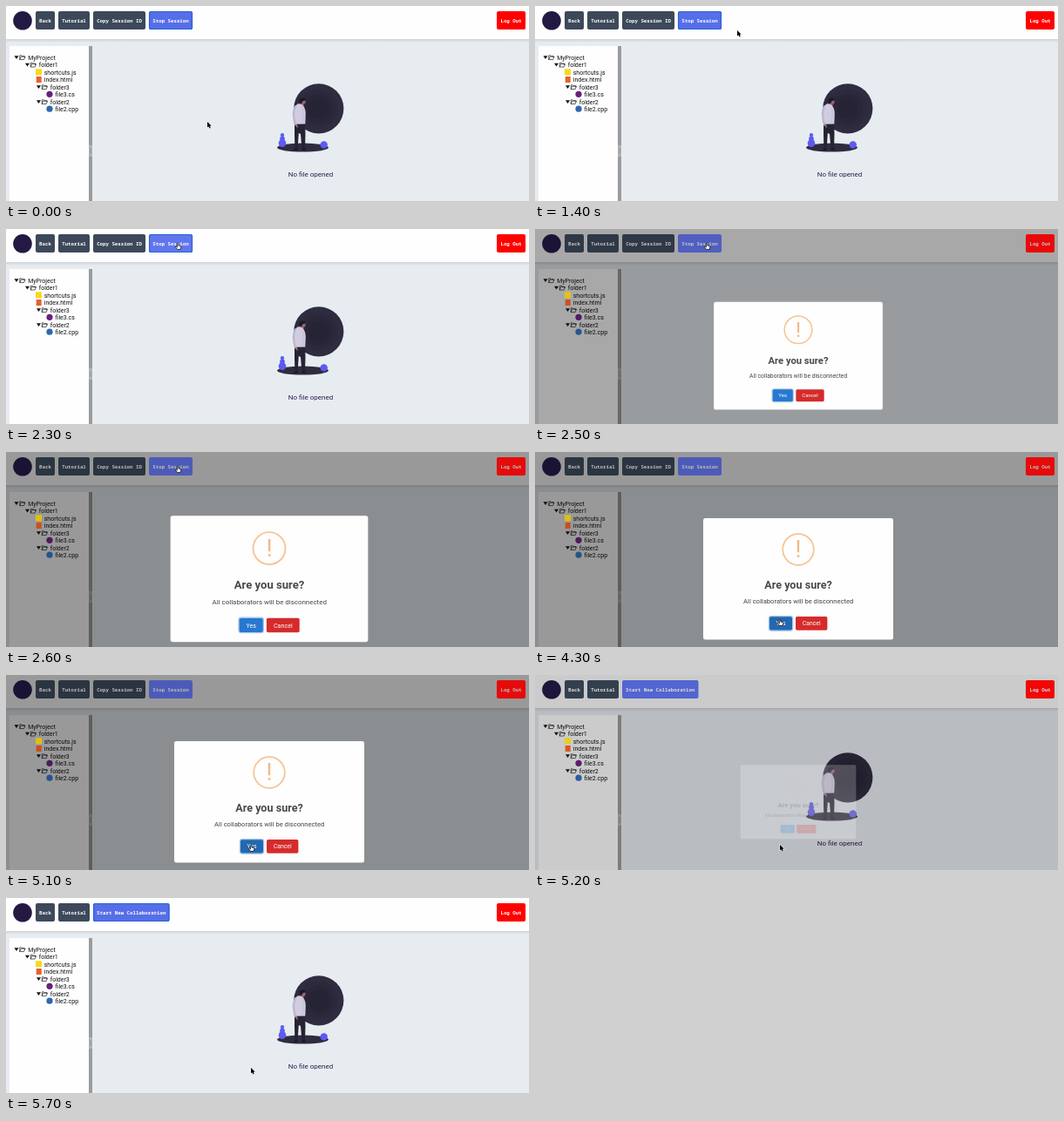
An HTML page with a canvas that plays this animation: 600 px wide and 224 px high, repeating every 5800 ms.

```html
<!DOCTYPE html>
<html lang="en">
<head>
<meta charset="utf-8">
<title>Stop session</title>
<style>
html, body { margin: 0; width: 100%; height: 100%; overflow: hidden; }
canvas { display: block; width: 600px; height: 224px; }
</style>
</head>
<body>
<canvas id="stage" width="600" height="224"></canvas>
<script>
const ctx = document.getElementById('stage').getContext('2d');
const LOOP = 5800, STEP = 100;
const SANS = 'Roboto, Arial, sans-serif';
const MONO = '"Noto Sans Mono", "DejaVu Sans Mono", monospace';
const INK = '#2f2c40', BLUE = '#5d5af2';

// time, x, y of the pointer tip
const path = [
  [0, 231, 133], [200, 231, 133], [700, 231, 84], [1200, 232, 32],
  [1400, 232, 28], [1500, 229, 26], [1800, 202, 18], [2000, 197, 16],
  [3000, 197, 16], [3200, 206, 46], [3600, 269, 165],
  [3900, 280, 191], [4300, 281, 192], [4900, 281, 195], [5800, 281, 195]
];
// time, scale of the dialog
const zoom = [[2460, 0.7], [2595, 1.05], [2700, 0.95], [2760, 1], [5125, 1], [5275, 0.5]];
const shade = [[2420, 0], [2500, 0.34], [2600, 0.4], [5120, 0.4], [5200, 0.2], [5280, 0]];

const clamp = v => Math.max(0, Math.min(1, v));
const lerp = (a, b, k) => a + (b - a) * k;
const smooth = k => k * k * (3 - 2 * k);
const easeOut = k => 1 - Math.pow(1 - k, 2.2);
const linear = k => k;

function track(keys, t, ease, col = 1) {
  if (t <= keys[0][0]) return keys[0][col];
  for (let i = 1; i < keys.length; i++) {
    const a = keys[i - 1], b = keys[i];
    if (t <= b[0]) return lerp(a[col], b[col], ease((t - a[0]) / (b[0] - a[0])));
  }
  return keys[keys.length - 1][col];
}

function mix(a, b, k) {
  const ch = (s, i) => parseInt(s.substr(1 + i * 2, 2), 16);
  return 'rgb(' + [0, 1, 2].map(i => Math.round(lerp(ch(a, i), ch(b, i), k))).join(',') + ')';
}

function rect(x, y, w, h, fill) {
  ctx.fillStyle = fill;
  ctx.fillRect(x, y, w, h);
}

function box(x, y, w, h, r, fill, line, width = 1) {
  ctx.beginPath();
  ctx.roundRect(x, y, w, h, r);
  if (fill) { ctx.fillStyle = fill; ctx.fill(); }
  if (line) { ctx.strokeStyle = line; ctx.lineWidth = width; ctx.stroke(); }
}

function oval(x, y, rx, ry, fill) {
  ctx.beginPath();
  ctx.ellipse(x, y, rx, ry, 0, 0, Math.PI * 2);
  ctx.fillStyle = fill;
  ctx.fill();
}

const dot = (x, y, r, fill) => oval(x, y, r, r, fill);

function shape(d, fill, line, width = 1) {
  const p = new Path2D(d);
  if (fill) { ctx.fillStyle = fill; ctx.fill(p); }
  if (line) {
    ctx.strokeStyle = line;
    ctx.lineWidth = width;
    ctx.lineJoin = ctx.lineCap = 'round';
    ctx.stroke(p);
  }
}

function text(s, x, y, font, fill, align = 'left') {
  ctx.font = font;
  ctx.fillStyle = fill;
  ctx.textAlign = align;
  ctx.fillText(s, x, y);
}

function page() {
  rect(0, 0, 600, 224, '#e7ecf1');
  const g = ctx.createLinearGradient(0, 38, 0, 42);
  g.addColorStop(0, '#cfd3d8');
  g.addColorStop(1, '#e7ecf1');
  rect(0, 38, 600, 4, g);
  rect(0, 0, 600, 38, '#fefefe');
  rect(4, 46, 91, 178, '#fefefe');
  rect(95, 46, 4, 178, '#9c9c9c');
  rect(95, 160, 4, 13, '#b4b4b4');
  rect(96.5, 163, 1, 7, '#8c8c8c');
}

function folder(x, y, name) {
  shape(`M${x} ${y - 1.7}h5l-2.5 3.6z`, '#111111');
  shape(`M${x + 6.3} ${y + 2.2}v-4.4h2l.7 .9h2.6v1.2M${x + 6.3} ${y + 2.2}l1.4-3.1h4.9l-1.3 3.1z`,
    null, '#222222', 0.7);
  text(name, x + 15.7, y + 2.5, '7px ' + SANS, '#111111');
}

function tree() {
  folder(9.5, 59, 'MyProject');
  folder(22, 67.5, 'folder1');
  folder(35, 93, 'folder3');
  folder(35, 110, 'folder2');
  const file = (s, x, y) => text(s, x, y + 2.5, '7px ' + SANS, '#111111');
  file('shortcuts.js', 43.7, 76);
  file('index.html', 43.7, 84.5);
  file('file3.cs', 56.5, 101.5);
  file('file2.cpp', 56.5, 118.5);
}

function icons(k) {
  rect(34, 72.3, 7, 7, mix('#f7d91e', '#e0c010', k));
  rect(34.7, 81, 6, 7, mix('#e8602c', '#c8501f', k));
  dot(50, 101.3, 3.6, mix('#68217a', '#4c1a5c', k));
  dot(50, 118.2, 3.6, mix('#2f66ad', '#27538c', k));
}

function picture() {
  oval(340.5, 162.6, 29.5, 5, INK);
  dot(358.8, 117.8, 28.6, INK);
  for (const r of [22, 17, 12]) {
    ctx.beginPath();
    ctx.arc(358.8, 117.8, r, 0, Math.PI * 2);
    ctx.fillStyle = 'rgba(0,0,0,.07)';
    ctx.fill();
  }
  dot(317, 157.6, 4.3, BLUE);
  dot(317, 152.4, 2.8, BLUE);
  dot(317, 148.2, 2.1, BLUE);
  dot(364.7, 159.4, 4.2, BLUE);
  // standing figure
  shape('M331 134L343 134L343.5 147L343 163.5L339.4 164L338 147L335.8 146L334.6 164L331.4 164.4L331 148Z', '#252334');
  shape('M331.2 163.6h3.4l-.2 2.4h-4.6zM339.4 163.2h3.6l1.8 2.5h-5.2z', '#1b1a28');
  shape('M338.8 111.5L342 112L341 116L337.4 115Z', '#a0616a');
  shape('M334.6 112.6Q338 111.4 341 114.6Q344.2 119 343.7 126L343.3 135.4L331 135.8Q331.6 128 330.2 123Q329.6 115.5 334.6 112.6Z', '#d0cde1');
  shape('M332 115.5Q329.6 120 330 126L331.2 134L333 136.8', null, '#bbb8d0', 2.4);
  shape('M333 136.6L334.2 138.8', null, '#a0616a', 1.7);
  shape('M340.5 117L341.3 126L340 134', null, '#bbb8d0', 0.7);
  dot(340.6, 109.9, 3, '#a0616a');
  shape('M336.4 110.8Q335.6 106.4 339.6 105.6Q343.2 105.2 343.8 108.2L340.4 109.2L339 112.3Z', '#1b1a28');
  text('No file opened', 349.5, 196, '8px ' + SANS, '#2a1d4a', 'center');
}

function button(x, w, label, fill, ink, ring) {
  box(x, 6, w, 21, 2, fill);
  if (ring) box(x + 0.5, 6.5, w - 1, 20, 2, null, '#2563d6', 1.2);
  text(label, x + w / 2, 18.6, 'bold 5.75px ' + MONO, ink, 'center');
}

function header(k, stopped, ring, hover) {
  const dark = mix('#3d495a', '#2b3542', k), ink = mix('#ffffff', '#bcbcbc', k);
  const blue = mix(hover ? '#6176ee' : '#566ee8', '#4d5bb8', k);
  dot(19, 16.8, 10.8, mix('#231942', '#1a1334', k));
  button(34, 22, 'Back', dark, ink);
  button(60, 36, 'Tutorial', dark, ink);
  if (stopped) {
    button(100, 87.5, 'Start New Collaboration', blue, ink, ring);
  } else {
    button(100, 60, 'Copy Session ID', dark, ink);
    button(164, 50, 'Stop Session', blue, ink, ring);
  }
  button(563, 33, 'Log Out', mix('#fe0000', '#e60b0b', k), ink);
}

function dialog(scale, alpha, hover) {
  ctx.save();
  ctx.globalAlpha = alpha;
  ctx.translate(302, 145.7);
  ctx.scale(scale, scale);
  ctx.translate(-302, -145.7);
  box(193, 76, 218, 139.4, 2.5, '#fefefe');
  ctx.beginPath();
  ctx.arc(302, 112, 17.8, 0, Math.PI * 2);
  ctx.strokeStyle = '#f6c596';
  ctx.lineWidth = 1.8;
  ctx.stroke();
  text('!', 302, 121.4, '27px ' + SANS, '#f3b984', 'center');
  text('Are you sure?', 302, 156.5, 'bold 12.6px ' + SANS, '#494949', 'center');
  text('All collaborators will be disconnected', 302.2, 174, '7.63px ' + SANS, '#444444', 'center');
  box(268.6, 188.8, 26.8, 16.2, 2.4, null, '#a5c8ec', 1.8);
  box(269, 189.2, 26, 15.4, 1.8, hover ? '#2268b0' : '#2778cf');
  box(299, 189, 36.4, 15.8, 1.8, '#d52b2b');
  text('Yes', 282, 199.4, '6.9px ' + SANS, '#ffffff', 'center');
  text('Cancel', 317.2, 199.4, '6.9px ' + SANS, '#ffffff', 'center');
  ctx.restore();
}

function pointer(x, y, hand) {
  ctx.save();
  ctx.translate(x, y);
  if (hand) {
    shape('M-.7 .6Q0-.5 .8 .6V3L3.2 3.5Q4 3.8 3.8 5L3.2 7.4H-.5L-2.6 4.6Q-2.5 3.6-1.5 4L-.7 4.7Z',
      '#ffffff', '#111111', 0.8);
  } else {
    shape('M0 0V6.6L1.5 5.2L2.6 7.6L3.7 7.1L2.7 4.8H4.6Z', '#000000', '#ffffff', 0.9);
    shape('M0 0V6.6L1.5 5.2L2.6 7.6L3.7 7.1L2.7 4.8H4.6Z', '#000000');
  }
  ctx.restore();
}

function draw(t) {
  const dim = track(shade, t, linear), k = dim / 0.4;
  const open = t >= 2460 && t < 5275;
  const stopped = t >= 5150;
  const x = track(path, t, smooth), y = track(path, t, smooth, 2);
  const overStop = t < 3100 && x < 213 && y < 27;
  const overYes = t < 5150 && x > 269 && x < 295 && y > 188;

  page();
  tree();
  picture();
  rect(0, 0, 600, 224, `rgba(0,0,0,${dim})`);
  header(k, stopped, !open, overStop);
  icons(k);
  if (open) {
    const fade = easeOut(clamp((t - 5125) / 150));
    const scale = t < 5125 ? track(zoom, t, easeOut) : lerp(1, 0.5, fade);
    dialog(scale, 1 - fade, overYes);
  }
  pointer(x, y, overStop || overYes);
}

const start = performance.now();
function tick() {
  const t = (performance.now() - start) % LOOP;
  draw(Math.floor(t / STEP) * STEP);
  requestAnimationFrame(tick);
}
tick();
</script>
</body>
</html>
```
